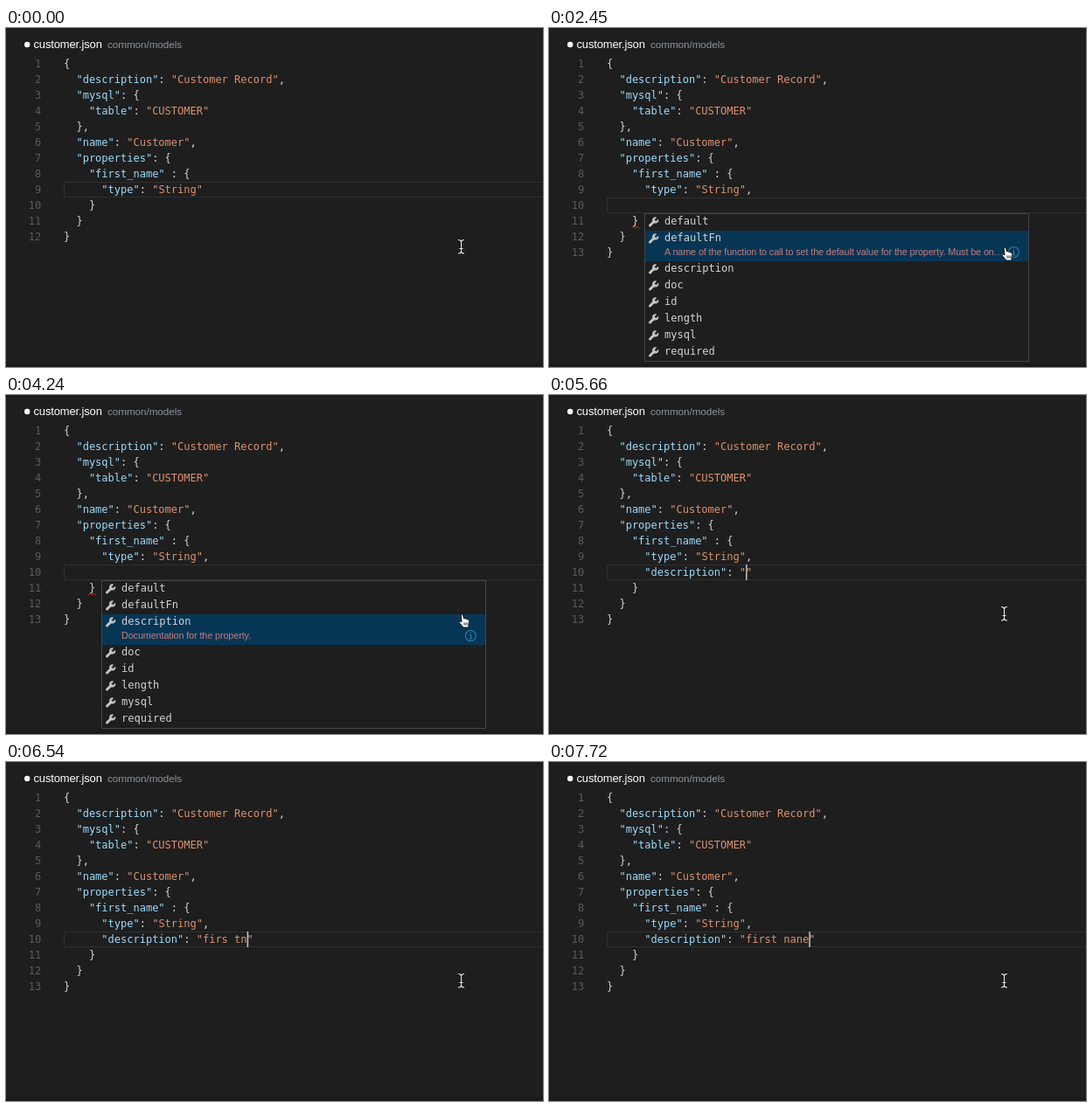
An HTML page that plays this animation: 614x388 px, repeating every 8 s.

```html
<!DOCTYPE html>
<html lang="en">
<head>
<meta charset="utf-8">
<title>JSON editing</title>
<style>
  html, body { margin: 0; width: 100%; height: 100%; overflow: hidden; background: #1e1e1e; }
  svg { display: block; width: 614px; height: 388px; }
  text { white-space: pre; }
  .code { font: 12px "DejaVu Sans Mono", monospace; fill: #d4d4d4; }
  .num { fill: #5a5a5a; text-anchor: end; }
  .key { fill: #9cdcfe; }
  .str { fill: #de9271; }
  .ui { font-family: "Liberation Sans", sans-serif; }
  .doc { font-size: 10.8px; letter-spacing: -.1px; fill: #c27c7e; }
</style>
</head>
<body>
<svg id="stage" viewBox="0 0 614 388">
  <rect width="614" height="388" fill="#1e1e1e"/>
  <rect y="384" width="614" height="4" fill="#1a1a1a"/>
  <circle cx="24.2" cy="19" r="3.2" fill="#fff"/>
  <text class="ui" x="31.5" y="23" font-size="13" letter-spacing="-.15" fill="#fff">customer.json</text>
  <text class="ui" x="116" y="23" font-size="11.7" letter-spacing="-.06" fill="#8d949b">common/models</text>
  <g id="view"></g>
</svg>
<script>
const LOOP = 8000, CHAR = 7.224, LEFT = 66, TOP = 32, LINE = 18, ROW = 19, OPEN_ROW = 35;
const view = document.getElementById('view');

const head = [
  '{',
  '  "description": "Customer Record",',
  '  "mysql": {',
  '    "table": "CUSTOMER"',
  '  },',
  '  "name": "Customer",',
  '  "properties": {',
  '    "first_name" : {'
];
const tail = ['    }', '  }', '}'];

const options = [
  ['default', 'Default value for the property. The type must match that specified by `type`.'],
  ['defaultFn', 'A name of the function to call to set the default value for the property. Must be on…'],
  ['description', 'Documentation for the property.'],
  ['doc', '**DEPRECATED** Use `description` instead'],
  ['id'], ['length'], ['mysql'], ['required']
];

// [time, selected option]; -1 means the list is closed
const picks = [[0, -1], [1620, 0], [2450, 1], [2920, 2], [3340, 3], [3880, 2], [4650, -1]];
const caretOn = [[420, 1260], [1740, 2210], [2750, 3220], [3700, 4240], [4650, 5180], [5660, LOOP]];

// '<' deletes one character
const bursts = [
  { keys: 'firs tn', from: 6010, to: 6540 },
  { keys: '<<<t nan', from: 6900, to: 7600 },
  { keys: 'e', from: 7720, to: 7720 }
];

function typed(t) {
  let out = '';
  for (const { keys, from, to } of bursts) {
    const step = (to - from) / Math.max(1, keys.length - 1);
    [...keys].forEach((k, i) => {
      if (t >= from + i * step) out = k === '<' ? out.slice(0, -1) : out + k;
    });
  }
  return out;
}

function stateAt(t) {
  const body = ['      "type": "String"' + (t >= 420 ? ',' : '')];
  let row = 8, col = body[0].length;
  if (t >= 780) {
    const text = t >= 4650 ? '      "description": "' + typed(t) : '      ';
    body.push(t >= 4650 ? text + '"' : text);
    row = 9;
    col = text.length;
  }
  return {
    lines: [...head, ...body, ...tail], row, col,
    caret: caretOn.some(([a, b]) => t >= a && t < b),
    error: t >= 480 && t < 4830,
    pick: picks.filter(p => p[0] <= t).pop()[1]
  };
}

function paint(line) {
  return line.replace(/"[^"]*"(?=(\s*:)?)/g, (s, colon) =>
    `<tspan class="${colon ? 'key' : 'str'}">${s}</tspan>`);
}

function codeLine(line, i) {
  const y = TOP + 13 + i * LINE, indent = line.search(/\S|$/);
  return `<text class="code num" x="40.3" y="${y}">${i + 1}</text>` +
    `<text class="code" x="${LEFT + indent * CHAR}" y="${y}">${paint(line.trim())}</text>`;
}

function wrench(x, y) {
  return `<g transform="translate(${x} ${y})" fill="none" stroke="#c5c5c5">
    <path d="M-4 4L1 -1" stroke-width="3" stroke-linecap="round"/>
    <path d="M2.9 -4.6A2.6 2.6 0 1 0 4.8 -2.5" stroke-width="2.2"/></g>`;
}

function popup(pick) {
  let y = 213;
  let out = '<rect x="109.5" y="212.5" width="439" height="169" fill="#1e1e1e" stroke="#454545"/>';
  options.forEach(([label, doc], i) => {
    const open = i === pick;
    if (open) {
      out += `<rect x="110" y="${y}" width="438" height="${OPEN_ROW}" fill="#073655"/>
        <text class="ui doc" x="132" y="${y + 28}">${doc}</text>
        <g fill="none" stroke="#2b7cab" stroke-width="1.1"><circle cx="531.3" cy="${y + 24.5}" r="6"/>
        <path d="M530 ${y + 23.5}h1.5v4.5M529.8 ${y + 28}h3.4M530.7 ${y + 21.3}h1.3"/></g>`;
    }
    out += wrench(119.5, y + 9) + `<text class="code" x="132" y="${y + 12}">${label}</text>`;
    y += open ? OPEN_ROW : ROW;
  });
  return out;
}

const hand = `<g transform="translate(517 250)" stroke="#111" stroke-width=".9" stroke-linejoin="round">
  <path fill="#fff" d="M3.2 1.5q1.4-1.2 2.2.5l1.2 4q1.4-.8 2.2.4q1.4-.6 2 .6q1.6-.2 1.8 1.4q.4 3-.6 5l-.2 2.6h-6q-1.4-2.6-4.4-5.2q-1-1.6.8-1.8l1.8 1z"/>
  <path fill="none" d="M7 10.5v3M9 10.5v3M11 10.5v3"/></g>`;
const beamPath = 'M517 242.5q3 0 3.5 2q.5-2 3.5-2M520.5 244.5v11.5M517 258q3 0 3.5-2q.5 2 3.5 2M518.5 252.5h4';
const beam = `<g fill="none"><path d="${beamPath}" stroke="#111" stroke-width="2.6"/>
  <path d="${beamPath}" stroke="#eee" stroke-width="1.1"/></g>`;

function draw({ lines, row, col, caret, error, pick }) {
  const y = TOP + row * LINE;
  let out = `<rect x="66.5" y="${y + .5}" width="560" height="17" fill="none" stroke="#2f2f2f"/>`;
  out += lines.map(codeLine).join('');
  if (error) {
    out += `<path d="M94.5 ${y + 35}l2 -2 2 2 2 -2 2 2" fill="none" stroke="#e8302c"/>`;
  }
  if (caret) {
    out += `<rect x="${LEFT + col * CHAR + .1}" y="${y}" width="1.5" height="${LINE}" fill="#c4c5c3"/>`;
  }
  return out + (pick < 0 ? beam : popup(pick) + hand);
}

let shown = '';
function tick() {
  const state = stateAt(performance.now() % LOOP), key = JSON.stringify(state);
  if (key !== shown) {
    view.innerHTML = draw(state);
    shown = key;
  }
  requestAnimationFrame(tick);
}
tick();
</script>
</body>
</html>
```
